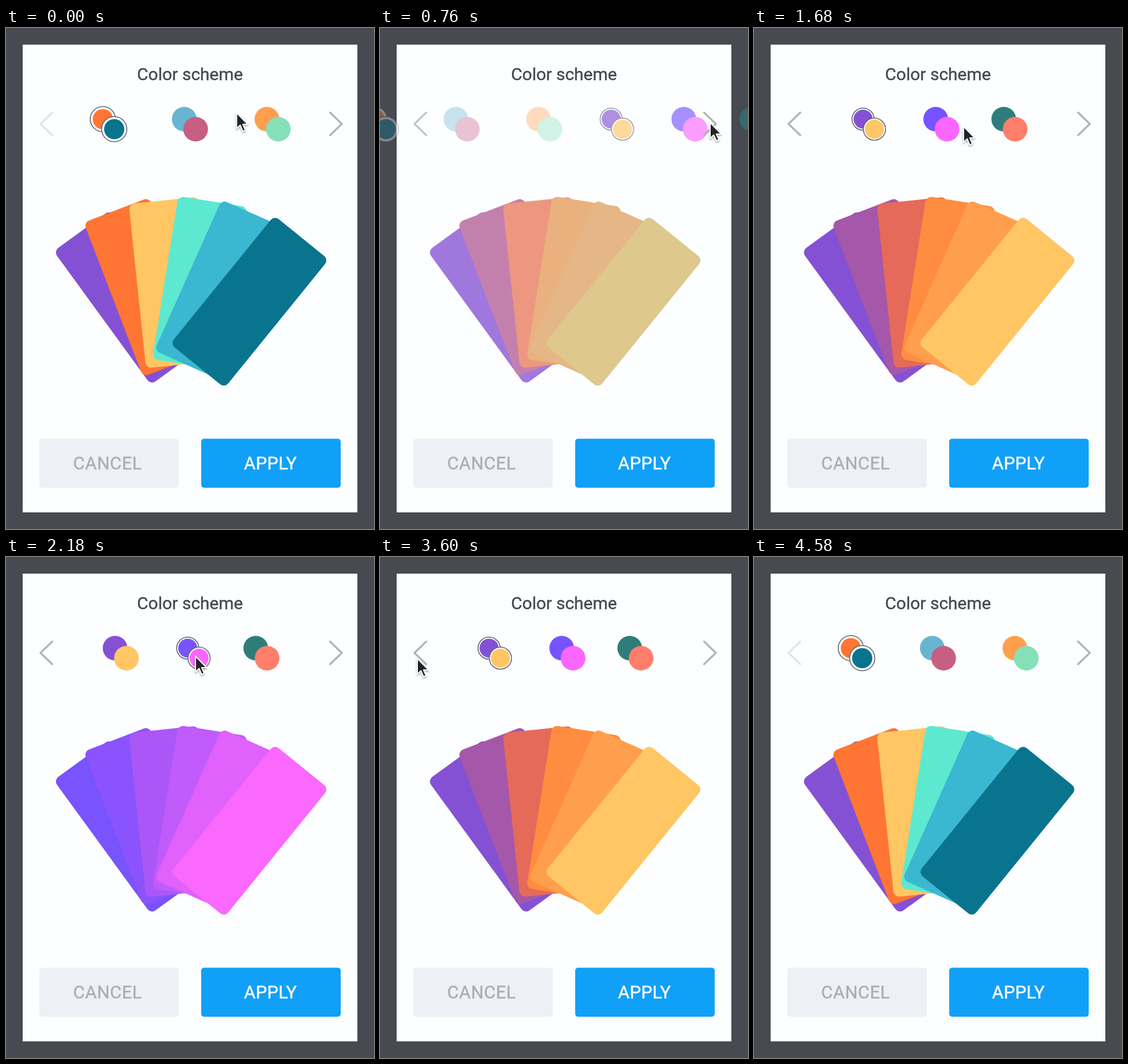
Recreate the animation shown at these times as an HTML page. Size 641x874 px, loop 4600 ms.

```html
<!DOCTYPE html>
<html lang="en">
<head>
<meta charset="utf-8">
<title>Color scheme</title>
<style>
  html, body { margin: 0; width: 100%; height: 100%; overflow: hidden; background: #474a51; }
  svg { display: block; }
  text { font-family: Roboto, sans-serif; text-anchor: middle; }
  .arrow { fill: none; stroke: #b1b4b9; stroke-width: 3.4; stroke-linecap: round; stroke-linejoin: round; }
  #cursor { filter: drop-shadow(0 2px 1.5px rgba(0, 0, 0, .35)); }
</style>
</head>
<body>
<svg width="641" height="874" viewBox="0 0 641 874">
  <rect width="641" height="874" fill="#474a51"/>
  <rect x="29" y="29" width="583" height="816" fill="#fcfeff"/>
  <text x="320.5" y="91" font-size="30" fill="#45484e" stroke="#45484e" stroke-width=".4">Color scheme</text>
  <g id="fans"></g>
  <rect x="58" y="716.5" width="243" height="85.5" rx="5" fill="#eff0f5"/>
  <rect x="340" y="716.5" width="243" height="85.5" rx="5" fill="#11a0f8"/>
  <text x="177" y="769.5" font-size="31" letter-spacing=".5" fill="#a9aeb5" stroke="#a9aeb5" stroke-width=".4">CANCEL</text>
  <text x="460.5" y="769.5" font-size="31" letter-spacing=".2" fill="#fff" stroke="#fff" stroke-width=".5">APPLY</text>
  <g id="pages"></g>
  <path id="prev" class="arrow" d="M80.5 147.500L60 167.300L80.500 187"/>
  <path class="arrow" d="M564.500 147.500L585 167.300L564.500 187"/>
  <path id="cursor" d="M0 0V27.500L6.300 21.500L10.800 32L15.300 30L10.900 20H19.500Z"
        fill="#222327" stroke="#fff" stroke-width="2" stroke-linejoin="round"/>
</svg>
<script>
const LOOP = 4600, SPAN = 400, PAGE_GAP = 391;
const NEXT = 570, PICK_SECOND = 1850, PICK_FIRST = 2740, BACK = 3608;

const $ = id => document.getElementById(id);

function add(parent, tag, attrs = {}) {
  const el = document.createElementNS("http://www.w3.org/2000/svg", tag);
  for (const key in attrs) el.setAttribute(key, attrs[key]);
  return parent.appendChild(el);
}

// Fans: cards are listed from back to front, 15 degrees apart.
const centers = [[217, 470], [244, 452], [289.5, 444], [337.8, 445], [372.8, 456], [424, 477.5]];
const palettes = {
  ocean: ["#8551d4", "#ff7534", "#ffc663", "#5ce9cf", "#3ab7d1", "#09748e"],
  candy: ["#7753ff", "#8a52ff", "#ab56fa", "#c15aff", "#e060ff", "#fb66ff"],
  sunset: ["#8551d4", "#a557a9", "#e56a5a", "#ff8c40", "#ff9f4d", "#ffc663"]
};
const fans = {};
for (const name in palettes) {
  fans[name] = add($("fans"), "g");
  centers.forEach(([x, y], i) => add(fans[name], "rect", {
    x: -61, y: -144, width: 122, height: 288, rx: 10, fill: palettes[name][i],
    transform: `translate(${x} ${y}) rotate(${i * 15 - 36})`
  }));
}

// A swatch has a plain look and a ringed look for the selected state.
function swatch(page, x, back, front, ring = 19.3) {
  const plain = add(page, "g"), picked = add(page, "g");
  for (const [cx, cy, fill] of [[x, 159, back], [x + 19.8, 176.5, front]]) {
    add(plain, "circle", { cx, cy, r: 21.5, fill });
    add(picked, "circle", { cx, cy, r: ring, fill: "#fcfeff", stroke: "#62656d", "stroke-width": 1.6 });
    add(picked, "circle", { cx, cy, r: ring - 2.7 - (ring > 20 ? 1.7 : 0), fill });
  }
  return level => {
    plain.style.display = level === null ? "" : "none";
    picked.style.opacity = level ?? 0;
  };
}

const pageA = add($("pages"), "g"), pageB = add($("pages"), "g");
swatch(pageA, 168.7, "#ff7534", "#09748e", 22)(1);
swatch(pageA, 310.5, "#69b5d1", "#c75f82")(null);
swatch(pageA, 454.5, "#ff9f4d", "#86e0b7")(null);
const first = swatch(pageB, 190, "#8551d4", "#ffc663");
const second = swatch(pageB, 316.5, "#7753ff", "#fb66ff");
swatch(pageB, 435, "#2f7d7b", "#ff7e6b")(null);

const ease = t => t < .5 ? 2 * t * t : 1 - 2 * (1 - t) ** 2;
const progress = (t, from, span = SPAN) => ease(Math.min(1, Math.max(0, (t - from) / span)));
const fade = p => 1 - (1 - p) ** 1.7;

// Pointer moves: start, end, target x, target y.
const home = [355, 143.5];
const moves = [
  [-240, 500, 575, 165],
  [1300, 1820, 330, 173],
  [2200, 2680, 201, 178],
  [3080, 3520, 65, 177],
  [4000, 4300, 240, -45]
];

function pointer(t) {
  let [x, y] = home;
  for (const [start, end, tx, ty] of moves) {
    const p = progress(t, start, end - start);
    x += (tx - x) * p;
    y += (ty - y) * p;
  }
  return [x, y];
}

function draw(t) {
  const returning = t >= BACK;
  const slide = progress(t, returning ? BACK : NEXT);
  const shown = fade(slide);
  const shift = PAGE_GAP * (returning ? 1 - slide : slide);
  const pageLevel = returning ? 1 - shown : shown;

  pageA.setAttribute("transform", `translate(${-shift} 0)`);
  pageB.setAttribute("transform", `translate(${PAGE_GAP - shift} 0)`);
  pageA.style.opacity = 1 - pageLevel;
  pageB.style.opacity = pageLevel;
  $("prev").style.opacity = .35 + .65 * pageLevel;

  const toCandy = fade(progress(t, PICK_SECOND));
  const toSunset = fade(progress(t, PICK_FIRST));
  const secondPicked = t >= PICK_SECOND && t < PICK_FIRST;
  first(secondPicked ? null : t < PICK_SECOND ? 1 : toSunset);
  second(secondPicked ? toCandy : null);

  fans.ocean.style.opacity = 1 - pageLevel;
  fans.candy.style.opacity = toCandy * (1 - toSunset);
  fans.sunset.style.opacity = pageLevel * (t < PICK_FIRST ? 1 - toCandy : toSunset);

  $("cursor").setAttribute("transform", `translate(${pointer(t).join(" ")})`);
}

const began = performance.now();
function tick() {
  draw((performance.now() - began) % LOOP);
  requestAnimationFrame(tick);
}
tick();
</script>
</body>
</html>
```
